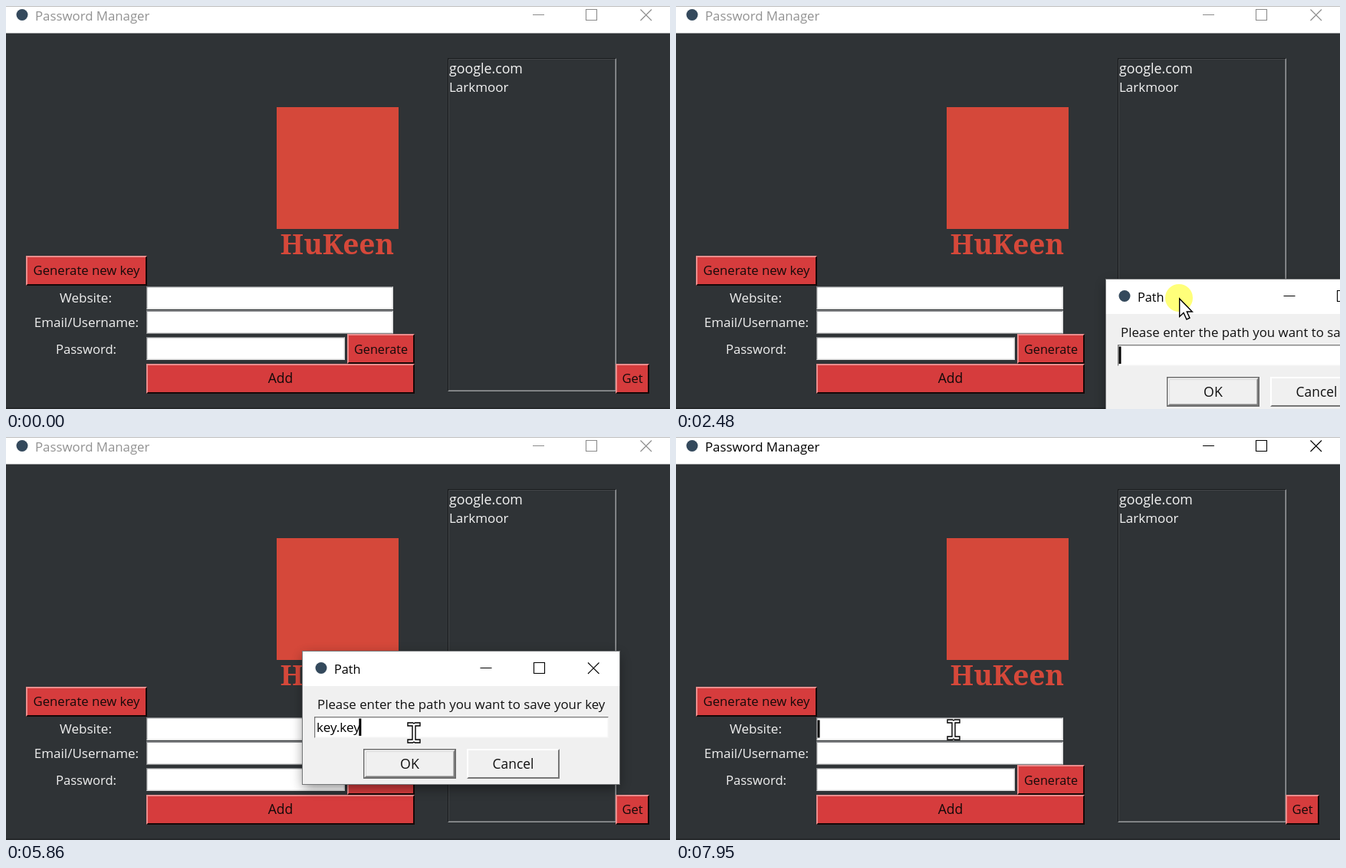
An HTML page that plays this animation: 866x526 px, repeating every 8000 ms.

```html
<!DOCTYPE html>
<html lang="en">
<head>
<meta charset="utf-8">
<title>Password Manager</title>
<style>
html, body { margin: 0; width: 100%; height: 100%; overflow: hidden; background: #2f3336; }
svg { display: block; width: 866px; height: 526px; font-family: "Open Sans", "Noto Sans", sans-serif; }
text { white-space: pre; }
</style>
</head>
<body>
<svg id="stage" viewBox="0 0 866 526" xmlns="http://www.w3.org/2000/svg"></svg>
<script>
const LOOP = 8000;
const RED = '#d63c3d', ICON = '#34495c';
const stage = document.getElementById('stage');

// ---------- drawing helpers ----------
const rect = (x, y, w, h, fill, more = '') =>
  `<rect x="${x}" y="${y}" width="${w}" height="${h}" fill="${fill}" ${more}/>`;
const label = (x, y, size, str, fill, more = '') =>
  `<text x="${x}" y="${y}" font-size="${size}" fill="${fill}" ${more}>${str}</text>`;
const mid = 'text-anchor="middle"';

// A box with light upper-left and dark lower-right edges
function bevel(x, y, w, h, fill, light, dark, d = 2) {
  const r = x + w, b = y + h;
  return rect(x, y, w, h, dark) +
    `<path d="M${x} ${b}V${y}H${r}l${-d} ${d}H${x + d}V${b - d}z" fill="${light}"/>` +
    rect(x + d, y + d, w - 2 * d, h - 2 * d, fill);
}
const entry = (x, y, w, h) => bevel(x, y, w, h, '#fff', '#85878a', '#dcdcdc', 1.5);

function button(id, x, y, w, h, str, size, base) {
  const cx = x + w / 2;
  return `<g id="${id}Up">${bevel(x, y, w, h, RED, '#ea8d8d', '#160808')}
    ${label(cx, base, size, str, '#140a0a', mid)}</g>
    <g id="${id}Down" display="none">${bevel(x, y, w, h, RED, '#160808', '#ea8d8d')}
    ${label(cx + 1.5, base + 1.5, size, str, '#140a0a', mid)}</g>`;
}

// Minimise, maximise and close signs around the line y
const controls = (a, b, c, y) =>
  `<path d="M${a} ${y}h15M${b} ${y - 7}h14v14h-14zM${c} ${y - 7}l14.5 14.5m0 -14.5l-14.5 14.5" fill="none" stroke-width="1.1"/>`;

const mainWindow = `
  ${rect(0, 0, 866, 526, '#2f3336')}
  ${rect(0, 0, 866, 35.5, '#fff')}
  ${rect(0, 0, 866, 1, '#bdbdbd')}
  ${rect(0, 524, 866, 2, '#25282a')}
  <circle cx="21" cy="11.5" r="7.5" fill="${ICON}"/>
  ${label(38, 19, 16.8, 'Password Manager', '#000', 'id="title"')}
  <g id="signs">${controls(687, 756.5, 827.5, 11.5)}</g>
  ${rect(353, 132, 159, 159, '#d5483a')}
  ${label(432, 324, 37, 'HuKeen', '#d5483a', mid + ' font-weight="900" style="font-family:\'Noto Serif\',serif"')}
  ${bevel(576, 68, 220, 435, '#2f3336', '#191b1d', '#9b9d9f', 1.5)}
  ${label(578, 88, 17.8, 'google.com', '#f4f4f4')}
  ${label(578, 111.5, 17, 'Larkmoor', '#f4f4f4')}
  ${label(104, 387, 17, 'Website:', '#f0f0f0', mid)}
  ${label(105, 418.5, 17, 'Email/Username:', '#f0f0f0', mid)}
  ${label(104.5, 453.5, 16.6, 'Password:', '#f0f0f0', mid)}
  ${entry(183, 366, 322, 30)}
  ${entry(183, 397.5, 322, 30)}
  ${entry(183, 432, 259, 30)}
  ${rect(184.5, 369.5, 3, 23, '#000', 'id="siteCaret"')}
  ${button('key', 26, 326, 158, 39, 'Generate new key', 16.7, 351)}
  ${button('gen', 445, 428, 88, 39, 'Generate', 16.2, 453.5)}
  ${button('add', 183, 467, 350, 39, 'Add', 17.6, 492)}
  ${button('get', 795, 467, 44, 39, 'Get', 16.6, 492)}`;

const okFace = (light, dark) => bevel(80, 128, 121, 39, '#6b6b6b', '#6b6b6b', '#6b6b6b', 1) +
  bevel(81.5, 129.5, 118, 36, '#f0f0f0', light, dark);

const dialogWindow = `
  <g id="dialog">
    ${rect(2, 6, 411, 173, '#000', 'filter="url(#soft)" opacity=".45"')}
    ${rect(0, 0, 415, 175, '#f0f0f0')}
    ${rect(0, 0, 415, 46, '#fff')}
    ${rect(.5, .5, 414, 174, 'none', 'stroke="#4b4e50" stroke-opacity=".75"')}
    <circle cx="25" cy="22.5" r="7.5" fill="${ICON}"/>
    ${label(42, 30, 16.3, 'Path', '#000')}
    <g stroke="#000">${controls(232.5, 302.5, 373, 22.5)}</g>
    ${label(20, 76, 16.87, 'Please enter the path you want to save your key', '#111')}
    ${bevel(16, 86, 384, 28, '#fff', '#7a7a7a', '#f4f4f4', 1.5)}
    ${label(19, 106, 17.1, '', '#000', 'id="typed"')}
    ${rect(17.5, 88.5, 3, 22.5, '#000', 'id="caret"')}
    <g id="okUp">${okFace('#fff', '#7d7d7d')}</g>
    <g id="okDown">${okFace('#7d7d7d', '#fff')}</g>
    ${label(140.5, 154, 17.8, 'OK', '#111', mid)}
    ${bevel(215, 128, 121, 39, '#f0f0f0', '#fff', '#767676')}
    ${label(275.5, 154, 17.4, 'Cancel', '#111', mid)}
  </g>`;

const pointer = `
  <g id="pointer" stroke="#000" stroke-width="1.4" fill="#fff">
    <circle id="halo" r="18" fill="#ff0" fill-opacity=".52" stroke="none"/>
    <path id="arrow" d="M.7 1V24.5L6 19.5L10 28L14 26.2L10.3 18H17.3z"/>
    <path id="beam" d="M-8 -13h6.5l1.5 1l1.5 -1h6.5v4h-6v18h6v4h-6.5l-1.5 -1l-1.5 1h-6.5v-4h6v-18h-6z"/>
  </g>`;

stage.innerHTML = `<defs><filter id="soft" x="-20%" y="-30%" width="140%" height="160%">
  <feGaussianBlur stdDeviation="8"/></filter></defs>` + mainWindow + dialogWindow + pointer;

const $ = id => document.getElementById(id);
const show = (id, on) => $(id).setAttribute('display', on ? 'inline' : 'none');
const within = (t, a, b) => t >= a && t < b;

// ---------- motion ----------
const ease = u => u * u * (3 - 2 * u);
const easeOut = u => 1 - (1 - u) ** 2;

// Point on a quadratic curve
const curve = (a, c, b, u) => a.map((v, i) =>
  (1 - u) ** 2 * v + 2 * u * (1 - u) * c[i] + u * u * b[i]);

// Progress 0..1 in n held steps; the first step happens at the start time
const held = (t, start, gap, n) =>
  Math.max(0, Math.min(n, Math.floor((t - start) / gap) + 1)) / n;

const HOME = [386, 279];
const DRAG = [[745, 440], [560, 356], [435, 299], [391, 280], [387, 279], HOME];
const KEY = [124, 339], GRIP = [482, 304], NEAR = [531, 438],
  FIELD = [532, 386], OK = [524, 420], SITE = [362, 382];

function dialogAt(t) {
  if (t < 2410 || t >= 7530) return null;
  return DRAG[Math.min(5, Math.floor((t - 2410) / 70))];
}

function pointerAt(t, box) {
  if (t < 310 || within(t, 1600, 2410)) return null;
  if (t < 1470) {
    const u = Math.min(1, Math.floor((t - 310) / 75) / 10);
    return curve([676, 480], [300, 290], KEY, easeOut(u));
  }
  if (t < 1540) return [171, 341];
  if (t < 1600) return [619, 437];
  if (t < 2760) return [box[0] + 96, box[1] + 25];
  if (t < 3250) return curve(GRIP, [520, 360], NEAR, ease(held(t, 2760, 70, 7)));
  if (t < 6450) return curve(NEAR, [531, 408], FIELD, easeOut(held(t, 3250, 68.5, 8)));
  if (t < 7530) return curve(FIELD, [566, 400], OK, ease(held(t, 6450, 85, 5)));
  return curve(OK, [450, 405], SITE, ease(held(t, 7530, 70, 7)));
}

function overField([x, y], box) {
  const hit = (l, top, r, b) => x > l && x < r && y > top && y < b;
  if (box && hit(box[0], box[1], box[0] + 415, box[1] + 175))
    return hit(box[0] + 16, box[1] + 86, box[0] + 400, box[1] + 114);
  return hit(183, 366, 505, 396) || hit(183, 398, 505, 428) || hit(183, 432, 442, 462);
}

const STROKES = [5030, 5140, 5260, 5460, 5560, 5700, 5800];

function draw(t) {
  const active = within(t, 1130, 1210) || t >= 7390;
  $('title').setAttribute('fill', active ? '#000' : '#929292');
  $('signs').setAttribute('stroke', active ? '#000' : '#8c8c8c');
  show('siteCaret', active);
  show('keyUp', !within(t, 1130, 1210));
  show('keyDown', within(t, 1130, 1210));

  const box = dialogAt(t);
  show('dialog', box);
  if (box) {
    const stageOut = t < 7390 ? 0 : t < 7460 ? 1 : 2;
    const s = [1, .985, .964][stageOut];
    $('dialog').setAttribute('opacity', [1, .62, .2][stageOut]);
    $('dialog').setAttribute('transform',
      `translate(${box[0] + 207.5 * (1 - s)} ${box[1] + 87.5 * (1 - s)}) scale(${s})`);
    const typed = $('typed');
    typed.textContent = 'key.key'.slice(0, STROKES.filter(k => t >= k).length);
    const end = typed.textContent ? typed.getComputedTextLength() : 0;
    $('caret').setAttribute('x', 17.5 + end);
    show('caret', t >= 7320 || (t - 2230) % 900 < 600);
    show('okUp', !within(t, 7320, 7390));
    show('okDown', within(t, 7320, 7390));
  }

  const p = pointerAt(t, box);
  show('pointer', p);
  if (p) {
    $('pointer').setAttribute('transform', `translate(${p[0].toFixed(2)} ${p[1].toFixed(2)})`);
    const beam = overField(p, box);
    show('beam', beam);
    show('arrow', !beam);
    show('halo', within(t, 1130, 1210) || within(t, 2410, 2760) ||
      within(t, 4060, 4200) || within(t, 7320, 7390));
  }
}

const began = performance.now();
function tick() {
  draw((performance.now() - began) % LOOP);
  requestAnimationFrame(tick);
}
draw(0);
requestAnimationFrame(tick);
</script>
</body>
</html>
```
